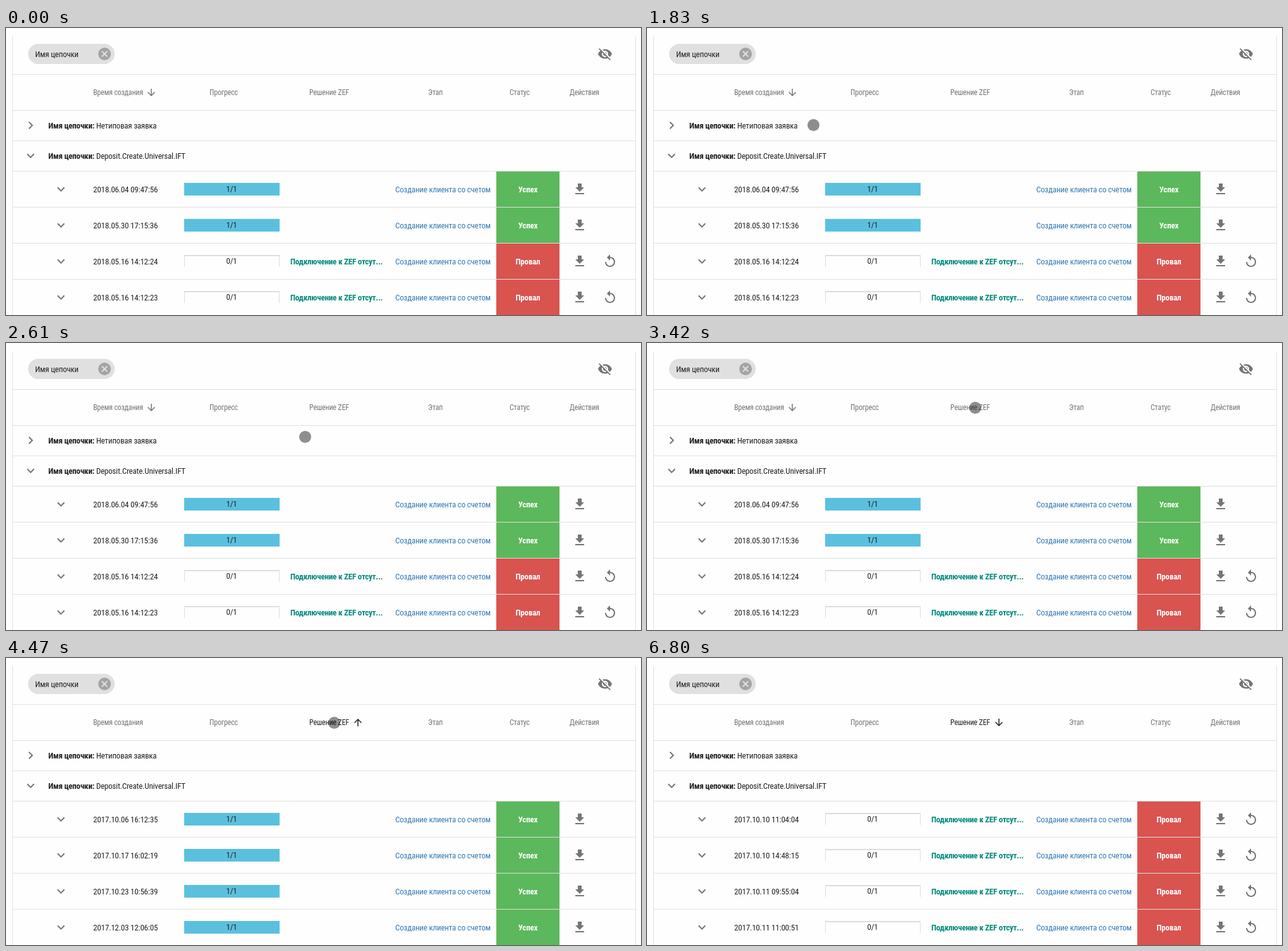
An HTML page that plays this animation: 1005x454 px, repeating every 8.05 s.

```html
<!DOCTYPE html>
<html lang="ru">
<head>
<meta charset="utf-8">
<style>
html, body { margin: 0; width: 100%; height: 100%; overflow: hidden; background: #fefefe; }
svg { display: block; width: 1005px; height: 454px; }
text { font: 13px "Roboto Condensed", Roboto, sans-serif; font-stretch: 75%; fill: #212121; white-space: pre; }
.head { font-size: 12px; fill: #757575; }
.b { font-weight: 700; }
.mid { text-anchor: middle; }
.link { fill: #337ab7; }
.teal { fill: #00897b; }
.white { fill: #fff; }
.icon { fill: #757575; }
.line { fill: #e0e0e0; }
</style>
</head>
<body>
<svg id="stage" viewBox="0 0 1005 454"></svg>
<script>
const LOOP = 8050;
const ICON = {
  cancel: 'M12 2a10 10 0 1 0 0 20 10 10 0 0 0 0-20zm5 13.59L15.59 17 12 13.41 8.41 17 7 15.59 10.59 12 7 8.41 8.41 7 12 10.59 15.59 7 17 8.41 13.41 12z',
  hidden: 'M12 7c2.76 0 5 2.24 5 5 0 .65-.13 1.26-.36 1.83l2.92 2.92c1.51-1.26 2.7-2.89 3.43-4.75-1.73-4.39-6-7.5-11-7.5-1.4 0-2.74.25-3.98.7l2.16 2.16C10.74 7.13 11.35 7 12 7zM2 4.27l2.28 2.28.46.46C3.08 8.3 1.78 10.02 1 12c1.73 4.39 6 7.5 11 7.5 1.55 0 3.03-.3 4.38-.84l.42.42L19.73 22 21 20.73 3.27 3zM7.53 9.8l1.55 1.55c-.05.21-.08.43-.08.65 0 1.66 1.34 3 3 3 .22 0 .44-.03.65-.08l1.55 1.55c-.67.33-1.41.53-2.2.53-2.76 0-5-2.24-5-5 0-.79.2-1.53.53-2.2zm4.31-.78l3.15 3.15.02-.16c0-1.66-1.34-3-3-3z',
  right: 'M10 6L8.59 7.41 13.17 12l-4.58 4.59L10 18l6-6z',
  down: 'M16.59 8.59L12 13.17 7.41 8.59 6 10l6 6 6-6z',
  load: 'M19 9h-4V3H9v6H5l7 7zM5 18v2h14v-2z',
  replay: 'M12 5V1L7 6l5 5V7c3.31 0 6 2.69 6 6s-2.69 6-6 6-6-2.69-6-6H4c0 4.42 3.58 8 8 8s8-3.58 8-8-3.58-8-8-8z',
  arrow: 'M20 12l-1.41-1.41L13 16.17V4h-2v12.17l-5.58-5.59L4 12l8 8z'
};

const text = (x, y, s, cls = '', id = '') => `<text x="${x}" y="${y}" class="${cls}" id="${id}">${s}</text>`;
const rect = (x, y, w, h, fill, rx = 0) => `<rect x="${x}" y="${y}" width="${w}" height="${h}" fill="${fill}" rx="${rx}"/>`;
const icon = (name, x, y, fill = '#757575') => `<path d="${ICON[name]}" transform="translate(${x} ${y})" fill="${fill}"/>`;
const GREY = '#e0e0e0';

function row(date, ok, i) {
  const y = 227 + 57 * i;
  const bar = ok
    ? rect(282, y + 18, 151, 20, '#5bc0de')
    : rect(282, y + 18, 151, 2, '#ddd') + rect(282, y + 18, 1, 19, '#ddd') + rect(432, y + 18, 1, 19, '#ddd');
  return icon('down', 75, y + 16) + text(138, y + 33, date) + bar +
    text(357, y + 32, ok ? '1/1' : '0/1', 'mid') +
    (ok ? '' : text(450, y + 33, 'Подключение к ZEF отсут...', 'b teal') + icon('replay', 944, y + 16)) +
    text(616, y + 33, 'Создание клиента со счетом', 'link') +
    rect(776, y, 100, 56, ok ? '#5cb85c' : '#d9534f') +
    text(826, y + 33, ok ? 'Успех' : 'Провал', 'b mid white') + icon('load', 896, y + 16);
}

const pages = [
  [['2018.06.04 09:47:56', 1], ['2018.05.30 17:15:36', 1], ['2018.05.16 14:12:24', 0], ['2018.05.16 14:12:23', 0]],
  [['2017.10.06 16:12:35', 1], ['2017.10.17 16:02:19', 1], ['2017.10.23 10:56:39', 1], ['2017.12.03 12:06:05', 1]],
  [['2017.10.10 11:04:04', 0], ['2017.10.10 14:48:15', 0], ['2017.10.11 09:55:04', 0], ['2017.10.11 11:00:51', 0]]
];
const heads = [[138, 'Время создания'], [322, 'Прогресс'], [480, 'Решение ZEF'], [668, 'Этап'], [797, 'Статус'], [892, 'Действия']];
const $ = id => document.getElementById(id);
const group = (y, name) => text(67, y, `<tspan class="b">Имя цепочки:</tspan> ${name}`);
const stage = $('stage');

stage.innerHTML =
  rect(10, 13, 1, 441, GREY) + rect(996, 13, 1, 441, GREY) +
  [73, 130, 178, 226, 283, 340, 397].map(y => rect(10, y, 987, 1, GREY)).join('') +
  rect(35, 25, 137, 32, GREY, 16) + text(46, 46, 'Имя цепочки') +
  icon('cancel', 144, 29, '#a4a4a4') + icon('hidden', 936, 29) +
  heads.map(([x, s], i) => text(x, 106, s, 'head', 'head' + i)).join('') +
  `<path id="oldSort" class="icon" d="${ICON.arrow}" transform="translate(221 93) scale(.75)"/>` +
  `<path id="newSort" fill="#212121" d="${ICON.arrow}"/>` +
  icon('right', 27, 142) + group(159, 'Нетиповая заявка') +
  icon('down', 27, 190) + group(207, 'Deposit.Create.Universal.IFT') +
  pages.map((p, n) => `<g id="page${n}">${p.map((r, i) => row(...r, i)).join('')}</g>`).join('') +
  '<circle id="dot" r="9.5" fill="#000" fill-opacity=".44"/>';

// One common tracking keeps the columns apart where no condensed face exists.
const link = stage.querySelector('.link');
const tracking = Math.min(0, (152 - link.getComputedTextLength()) / 26 / 13);
if (tracking < -.01) stage.style.letterSpacing = tracking + 'em';

// Pointer path: [step, x, y]
const path = [[0, 19.5, 153.5], [4, 111, 153.5], [8, 263.5, 153.5], [9, 297.5, 153.5], [12, 383, 153.5],
  [17, 473.5, 148.5], [19, 498.5, 139.5], [23, 520, 118], [27, 519.5, 102.5]];

function along(k) {
  let i = path.findIndex(p => p[0] > k) - 1;
  if (i < 0) return path[path.length - 1].slice(1);
  const a = path[i], b = path[i + 1], h = b[0] - a[0], u = (k - a[0]) / h;
  const slope = (j, c) => {
    const p = path[Math.max(0, j - 1)], q = path[Math.min(path.length - 1, j + 1)];
    return (q[c] - p[c]) / (q[0] - p[0]);
  };
  return [1, 2].map(c => {
    const d = b[c] - a[c], m = slope(i, c) * h, n = slope(i + 1, c) * h;
    return a[c] + u * (m + u * (3 * d - 2 * m - n + u * (m + n - 2 * d)));
  });
}

function pointer(t) {
  if (t < 1120 || t >= 6800) return null;
  if (t >= 6710) return [22.5, 226.5];
  if (t >= 6620) return [270, 165];
  return along(t < 2860 ? Math.floor((t - 1105) / 87) : Math.min(27, 20 + Math.floor((t - 2860) / 80)));
}

// Value of the last [time, value] pair reached
const at = (t, list) => list.reduce((v, [s, w]) => t >= s ? w : v, 0);

function draw(t) {
  const page = at(t, [[4320, 1], [5870, 2]]);
  pages.forEach((_, n) => $('page' + n).style.display = n === page ? '' : 'none');
  const fade = at(t, [[4320, .45], [4390, .9], [4470, 1]]);
  $('oldSort').style.opacity = 1 - fade;
  $('newSort').style.opacity = fade;
  $('head2').style.fill = page ? '#212121' : '';
  const turn = 180 - at(t, [[5870, 90], [5930, 146], [6010, 173], [6090, 180]]);
  $('newSort').setAttribute('transform', `translate(557 102) rotate(${turn}) scale(.75) translate(-12 -12)`);
  const p = pointer(t), dot = $('dot');
  dot.style.display = p ? '' : 'none';
  if (p) {
    dot.setAttribute('cx', p[0]);
    dot.setAttribute('cy', p[1]);
  }
}

const start = performance.now();
function tick() {
  draw((performance.now() - start) % LOOP);
  requestAnimationFrame(tick);
}
draw(0);
requestAnimationFrame(tick);
</script>
</body>
</html>
```
